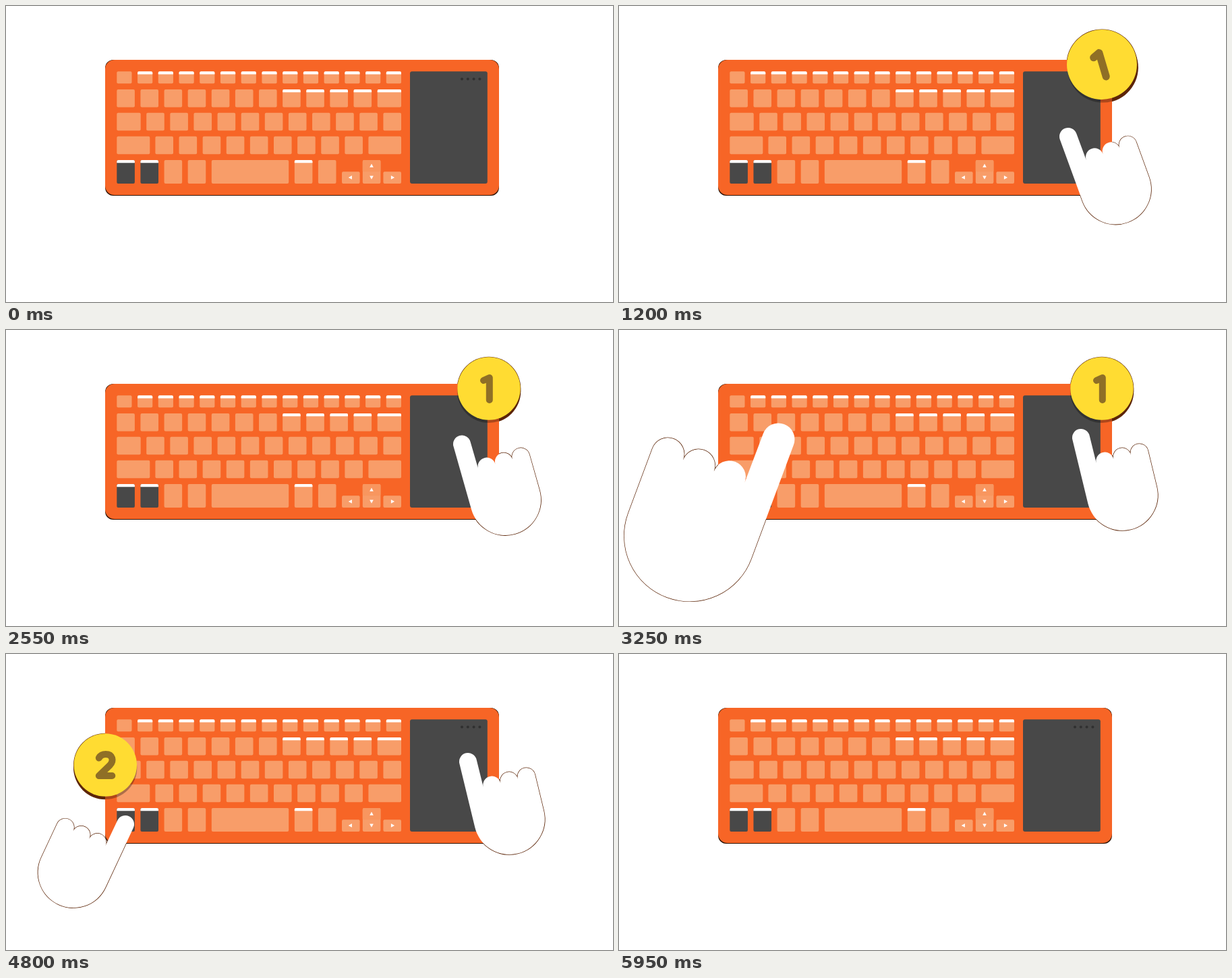
An HTML page with a canvas for the animation above (6 s loop, 900 px wide and 440 px high).

```html
<!DOCTYPE html>
<html lang="en">
<head>
<meta charset="utf-8">
<title>Keyboard gestures</title>
<style>
html, body { margin: 0; width: 100%; height: 100%; overflow: hidden; background: #fff; }
canvas { display: block; }
</style>
</head>
<body>
<canvas id="stage" width="900" height="440"></canvas>
<script>
const ctx = document.getElementById('stage').getContext('2d');
const LOOP = 6000, STEP = 50, RAD = Math.PI / 180;
const ORANGE = '#f76526', KEY = '#f89d69', DARK = '#484848';
const EDGE = '#5c2508', YELLOW = '#ffdc32', DIGIT = '#8f6f26';

const clamp = v => Math.max(0, Math.min(1, v));
const ramp = (t, a, b) => clamp((t - a) / (b - a));
const mix = (a, b, k) => a + (b - a) * k;
const easeSine = p => (1 - Math.cos(Math.PI * p)) / 2;

// Fingertip of the right hand: time, x, y, tilt in degrees
const SWIPE = [
  [700, 614, 254, 29.5], [900, 628, 238, 27], [1060, 647, 217, 23.5],
  [1200, 666, 194, 20], [1425, 694, 155, 13], [1650, 665, 191, 19],
  [1800, 643, 214, 23.2], [2075, 611, 246, 28], [2350, 660, 195, 19.5],
  [2550, 676, 169.5, 15.8], [2850, 685, 160, 13.6]
];

function slope(i, c) {
  const a = SWIPE[i - 1], b = SWIPE[i], d = SWIPE[i + 1];
  if (!a || !d || (b[c] - a[c]) * (d[c] - b[c]) <= 0) return 0;
  return (d[c] - a[c]) / (d[0] - a[0]);
}

function swipeAt(t) {
  const last = SWIPE.length - 1;
  if (t <= SWIPE[0][0]) return SWIPE[0].slice(1);
  if (t >= SWIPE[last][0]) return SWIPE[last].slice(1);
  const i = SWIPE.findIndex(p => p[0] > t) - 1;
  const a = SWIPE[i], b = SWIPE[i + 1], h = b[0] - a[0], u = (t - a[0]) / h;
  const w = u * u * (3 - 2 * u);
  return [1, 2, 3].map(c => mix(a[c], b[c], w)
    + h * u * (1 - u) * ((1 - u) * slope(i, c) - u * slope(i + 1, c)));
}

function box(x, y, w, h, r, color) {
  ctx.fillStyle = color;
  ctx.beginPath();
  ctx.roundRect(x, y, w, h, r);
  ctx.fill();
}

function disc(x, y, r, color) {
  ctx.fillStyle = color;
  ctx.beginPath();
  ctx.arc(x, y, r, 0, 2 * Math.PI);
  ctx.fill();
}

function key(x, y, w, h, cap, color = KEY) {
  box(x, y, w, h, 2, color);
  if (cap) box(x, y, w, 4.3, [2, 2, 0, 0], '#fff');
}

function arrow(x, y, turn) {
  ctx.save();
  ctx.translate(x, y);
  ctx.rotate(turn * Math.PI / 2);
  ctx.fillStyle = '#fff';
  ctx.beginPath();
  ctx.moveTo(0, -2.8);
  ctx.lineTo(2.8, 2.4);
  ctx.lineTo(-2.8, 2.4);
  ctx.fill();
  ctx.restore();
}

function drawKeyboard() {
  box(147, 80, 584, 202, 12, '#2e1304');
  box(147, 80, 584, 201, 14, ORANGE);

  const left = 164.3, right = 586, pitch = 35.12, size = 26.6;
  for (let i = 0; i < 14; i++) key(left + 30.73 * i, 97.3, 22.2, 18, i > 0);
  for (let i = 0; i < 11; i++) key(left + pitch * i, 124, size, 26.5, i > 6);
  key(550.7, 124, right - 550.7, 26.5, true);
  key(left, 158.8, 35.4, 26.5);
  for (let i = 0; i < 11; i++) key(208.2 + pitch * i, 158.8, size, 26.5);
  key(left, 193.8, 49, 26.5);
  for (let i = 0; i < 9; i++) key(221.4 + pitch * i, 193.8, size, 26.5);
  key(537.4, 193.8, right - 537.4, 26.5);

  const y = 228.9, tall = 35;
  for (let i = 0; i < 4; i++) key(left + pitch * i, y, size, tall, i < 2, i < 2 ? DARK : KEY);
  key(304.8, y, 114.4, tall);
  key(427.8, y, size, tall, true);
  key(462.9, y, size, tall);
  key(498, 246.3, size, 17.6);
  key(528.8, y, size, tall);
  box(528.8, y, size, 17.4, 2, '#f8965f');
  key(559.4, 246.3, size, 17.6);
  arrow(542, 237.4, 0);
  arrow(573.3, 254.9, 1);
  arrow(542, 254.9, 2);
  arrow(510.5, 254.9, 3);

  box(599, 97.3, 114.8, 166.6, 3, DARK);
  for (let i = 0; i < 4; i++) disc(676 + 8.8 * i, 108.4, 2, '#303030');
}

// Pointing hand; the fingertip centre is the origin
function handPath() {
  ctx.beginPath();
  ctx.arc(0, 0, 13, Math.PI, 0);
  for (const x of [26.3, 52.6, 78.9]) ctx.arc(x, 42, 13.1, Math.PI, 0);
  ctx.arc(39.5, 97.5, 52.5, 0, Math.PI);
  ctx.closePath();
}

function drawHand(h, outline) {
  if (h.alpha <= 0) return;
  ctx.save();
  ctx.globalAlpha = h.alpha;
  ctx.translate(h.x, h.y);
  ctx.scale(h.scale * h.side, h.scale);
  ctx.rotate(-h.tilt * RAD);
  handPath();
  if (outline) {
    ctx.strokeStyle = EDGE;
    ctx.lineWidth = 1.4 / h.scale;
    ctx.stroke();
  } else {
    ctx.fillStyle = '#fff';
    ctx.fill();
  }
  ctx.restore();
}

function placeCoin(c) {
  ctx.globalAlpha = c.alpha;
  ctx.translate(c.x, c.y);
  ctx.rotate(c.turn * RAD);
  ctx.scale(c.scale, c.scale);
}

function drawCoinEdge(c) {
  ctx.save();
  placeCoin(c);
  disc(0, 0, 47.3, EDGE);
  disc(0, 4, 47.3, EDGE);
  ctx.restore();
}

function drawCoin(c) {
  ctx.save();
  ctx.beginPath();
  ctx.roundRect(147, 80, 584, 201, 14);
  ctx.clip();
  placeCoin(c);
  disc(0, 4, 47, 'rgba(0,0,0,.3)');
  ctx.restore();

  ctx.save();
  placeCoin(c);
  disc(0, 0, 46.7, YELLOW);
  ctx.strokeStyle = DIGIT;
  ctx.lineWidth = 10;
  ctx.lineCap = ctx.lineJoin = 'round';
  ctx.beginPath();
  if (c.digit === 1) {
    ctx.moveTo(-8, -12);
    ctx.lineTo(0.8, -16);
    ctx.lineTo(0.8, 17);
  } else {
    ctx.moveTo(-9.5, -10.5);
    ctx.quadraticCurveTo(-6.5, -16, 0.5, -16);
    ctx.bezierCurveTo(11, -16, 13, -6, 6.5, 0.5);
    ctx.lineTo(-9.5, 16);
    ctx.lineTo(10, 16);
  }
  ctx.stroke();
  ctx.restore();
}

// Springy pop with a short spin
function coinAt(digit, x, y, t, start, out) {
  const u = t - start, v = u - 100;
  const scale = v < 0 ? Math.max(0, u / 100) : 1 + 0.31 * Math.exp(-0.006 * v) * Math.sin(0.0242 * v);
  return {
    digit, x, y,
    scale: u > 700 ? 1 : scale,
    turn: -90 * (1 - clamp(u / 350)) ** 2,
    alpha: u > 0 ? 1 - ramp(t, out, out + 300) : 0
  };
}

function draw(t) {
  const [x, y, tilt] = swipeAt(t);
  const lift = 1 - easeSine(ramp(t, 3000, 3950));
  const hands = [
    { x, y, tilt, scale: 1, side: 1, alpha: ramp(t, 400, 650) - ramp(t, 4950, 5200) },
    {
      x: mix(177, 247.8, lift), y: mix(253, 137.2, lift ** 1.4),
      tilt: mix(25, 19.5, lift), scale: mix(1, 2.015, lift), side: -1,
      alpha: ramp(t, 2650, 2900) - ramp(t, 5650, 5950)
    }
  ];
  const coins = [
    coinAt(1, 716, 87, t, 1000, 4500),
    coinAt(2, 147.3, 165, t, 3250, 5250)
  ].filter(c => c.alpha > 0);

  ctx.fillStyle = '#fff';
  ctx.fillRect(0, 0, 900, 440);
  // Dark rims show only outside the keyboard
  hands.forEach(h => drawHand(h, true));
  coins.forEach(drawCoinEdge);
  drawKeyboard();
  hands.forEach(h => drawHand(h, false));
  coins.forEach(drawCoin);
}

const begin = performance.now();
function tick() {
  const t = (performance.now() - begin) % LOOP;
  draw(Math.floor(t / STEP) * STEP);
  requestAnimationFrame(tick);
}
tick();
</script>
</body>
</html>
```
